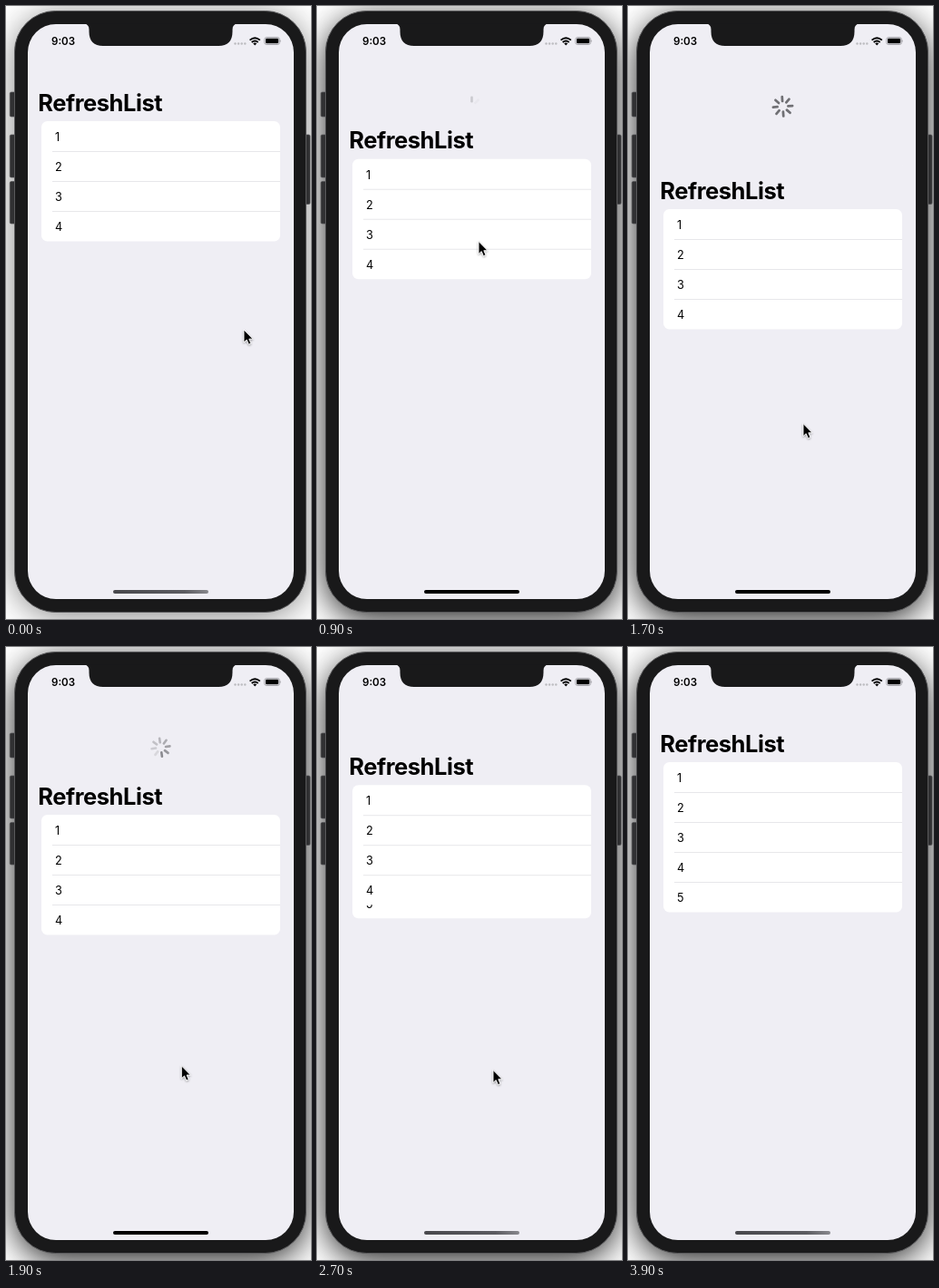
An HTML page for the animation above (6100 ms loop, 336 px wide and 676 px high).

```html
<!DOCTYPE html>
<html lang="en">
<head>
<meta charset="utf-8">
<title>Pull to refresh</title>
<style>
  html, body { margin: 0; width: 100%; height: 100%; overflow: hidden; background: #fff; }
  svg { display: block; width: 336px; height: 676px; }
  text { font-family: Inter, "Liberation Sans", sans-serif; fill: #000; }
  .title { font-size: 25.5px; font-weight: 700; letter-spacing: -.45px; }
  .row { font-size: 12.75px; }
  .clock { font-size: 11.6px; font-weight: 600; }
</style>
</head>
<body>
<svg viewBox="0 0 336 676">
  <defs>
    <filter id="blur" x="-30%" y="-20%" width="160%" height="140%"><feGaussianBlur stdDeviation="18"/></filter>
    <filter id="soft" x="-50%" y="-50%" width="200%" height="200%">
      <feDropShadow dx="0" dy="1" stdDeviation=".8" flood-opacity=".4"/>
    </filter>
    <linearGradient id="dimBar"><stop stop-color="#48484c"/><stop offset=".75" stop-color="#5c5c61"/><stop offset="1" stop-color="#88888d"/></linearGradient>
    <clipPath id="newRowClip"><rect x="39" y="259" width="263" height="33"/></clipPath>
  </defs>

  <rect width="336" height="676" fill="#fff"/>
  <rect id="shadow" x="9" y="5" width="322" height="664" rx="50" filter="url(#blur)"/>

  <g fill="#303032" stroke="#505052" stroke-width=".7">
    <rect x="4.3" y="95" width="7" height="27" rx="1.5"/>
    <rect x="4.3" y="142" width="7" height="47" rx="1.5"/>
    <rect x="4.3" y="193.500" width="7" height="46.500" rx="1.5"/>
    <rect x="328" y="142" width="7" height="76.500" rx="1.5"/>
  </g>
  <rect x="9.500" y="5.500" width="321" height="663" rx="45" fill="#19191a" stroke="#5a5a5c"/>
  <rect x="24" y="20" width="293" height="634" rx="31" fill="#efeef4"/>

  <g id="spinner"></g>

  <g id="content">
    <text class="title" x="35.3" y="115.500">RefreshList</text>
    <rect id="card" x="39" y="127" width="263" height="132.500" rx="6.500" fill="#fff"/>
    <g id="rows"></g>
    <g id="newRow" clip-path="url(#newRowClip)"><text id="newLabel" class="row" x="54" y="281">5</text></g>
  </g>

  <path d="M86 19.500Q91.500 20 91.500 26V28Q91.500 44 107 44H234Q249.500 44 249.500 28V26Q249.500 20 255 19.500Z" fill="#19191a"/>
  <text class="clock" x="50" y="43">9:03</text>
  <g id="signal" fill="#bcbcc0"></g>
  <g fill="none" stroke="#000" stroke-width="1.9">
    <path d="M268.6 37.6Q274.200 32.800 279.800 37.600"/>
    <path d="M270.700 40Q274.200 37 277.700 40"/>
  </g>
  <path d="M272.200 41.300Q274.200 39.800 276.200 41.300L274.200 43.400Z"/>
  <rect x="284.800" y="34.600" width="16.600" height="7.900" rx="2.300" fill="none" stroke="#8f8f93" stroke-width=".8"/>
  <rect x="286" y="35.800" width="14.200" height="5.500" rx="1.200"/>
  <path d="M302.200 37.200q1.300 1.300 0 2.700z" fill="#8f8f93"/>

  <rect id="homeBar" x="118" y="644" width="105" height="4" rx="2"/>
  <path id="cursor" filter="url(#soft)" d="M0 0V14L3.200 11.100L5.400 16.200L7.900 15.100L5.800 10.200H10Z" fill="#000" stroke="#fff" stroke-width=".9"/>
</svg>
<script>
const LOOP = 6100, TICK = 100, ROW = 33, REST = 45, ARMS = 8;
const $ = id => document.getElementById(id);
const clamp = v => Math.max(0, Math.min(1, v));

function add(parent, tag, attrs, label = '') {
  const node = document.createElementNS('http://www.w3.org/2000/svg', tag);
  set(node, attrs);
  node.textContent = label;
  return parent.appendChild(node);
}
function set(node, attrs) {
  for (const key in attrs) node.setAttribute(key, attrs[key]);
}

const separators = [];
for (let i = 0; i < 4; i++) {
  const top = 127 + i * ROW;
  add($('rows'), 'text', { class: 'row', x: 54, y: top + 22 }, i + 1);
  separators.push(add($('rows'), 'rect', { x: 51, y: top + ROW, width: 251, height: 1, fill: '#e7e7ea' }));
  add($('signal'), 'circle', { cx: 252.500 + i * 3.600, cy: 41.500, r: 1.200 });
}
const arms = Array.from({ length: ARMS }, (_, i) => add($('spinner'), 'rect', {
  x: -1.300, y: -11.300, width: 2.600, height: 7, rx: 1.200, fill: '#707074', transform: `rotate(${i * 45})`
}));

// [tick, x, y] of the pointer tip
const path = [
  [0, 262, 357], [3, 222, 268], [6, 180, 180], [7, 178, 194], [9, 178, 259.500],
  [13, 178, 331.500], [15, 186, 398], [16, 191, 440], [17, 193, 460.500],
  [23, 194, 464.500], [27, 194, 466.500], [29, 193, 468.500],
  [32, 193, 470], [33, 193, 471.500], [37, 193, 471.500], [38, 201, 474]
];

function pointerAt(tick) {
  const next = path.findIndex(p => p[0] >= tick);
  if (next < 0) return path[path.length - 1].slice(1);
  if (next === 0) return path[0].slice(1);
  const [t0, x0, y0] = path[next - 1], [t1, x1, y1] = path[next];
  const k = (tick - t0) / (t1 - t0);
  return [x0 + (x1 - x0) * k, y0 + (y1 - y0) * k];
}

// Ease of the closing header and the inserted row
function insertion(tick) {
  const k = clamp((tick - 25.300) / 3.700);
  return k * k * (3 - 2 * k);
}

function scrollAt(tick, pointerY, grown) {
  if (tick < 6) return 0;
  if (tick < 16) return 0.525 * (pointerY - 180);
  const spring = tick < 25 ? 52 * Math.min(1.400, 0.500 ** (tick - 17)) : 0;
  return (REST + spring) * (1 - grown);
}

function drawSpinner(tick, scroll) {
  const scale = tick === 16 ? 1.150 : tick === 17 ? 1.060 : tick === 26 ? 0.600 : 1;
  const angle = tick < 16 ? 0 : tick < 18 ? -4 : -8;
  set($('spinner'), {
    transform: `translate(170.500 110.800) rotate(${angle}) scale(${scale})`,
    opacity: tick > 26 ? 0 : tick === 26 ? 0.500 : 1
  });
  arms.forEach((arm, i) => {
    let alpha = 1;
    if (tick < 16) alpha = clamp((scroll - 20 - 18 * i) / 75);
    else if (tick > 17) {
      const lag = (tick - 23 - i + 4 * ARMS) % ARMS;
      alpha = 0.780 - 0.085 * lag;
    }
    set(arm, { opacity: alpha });
  });
}

function draw(time) {
  const tick = Math.floor(time % LOOP / TICK);
  const [x, y] = pointerAt(tick);
  const grown = insertion(tick);
  const scroll = scrollAt(tick, y, grown);
  const focused = tick >= 6;

  set($('shadow'), {
    opacity: focused ? 0.850 : 0.480,
    transform: `translate(0 ${focused ? 8 : 4})`
  });
  set($('content'), { transform: `translate(0 ${scroll.toFixed(2)})` });
  set($('card'), { height: 132.500 + ROW * grown });
  set($('newLabel'), { y: 281 - ROW * (1 - grown) });
  set($('newRow'), { opacity: grown > 0 ? 1 : 0 });
  set(separators[3], { opacity: grown === 1 ? 1 : 0 });
  set($('homeBar'), { fill: tick >= 8 && tick < 26 ? '#000' : 'url(#dimBar)' });
  set($('cursor'), { transform: `translate(${x} ${y})`, opacity: tick < 39 ? 1 : 0 });
  drawSpinner(tick, scroll);
}

const start = performance.now();
function loop() {
  draw(performance.now() - start);
  requestAnimationFrame(loop);
}
loop();
</script>
</body>
</html>
```
